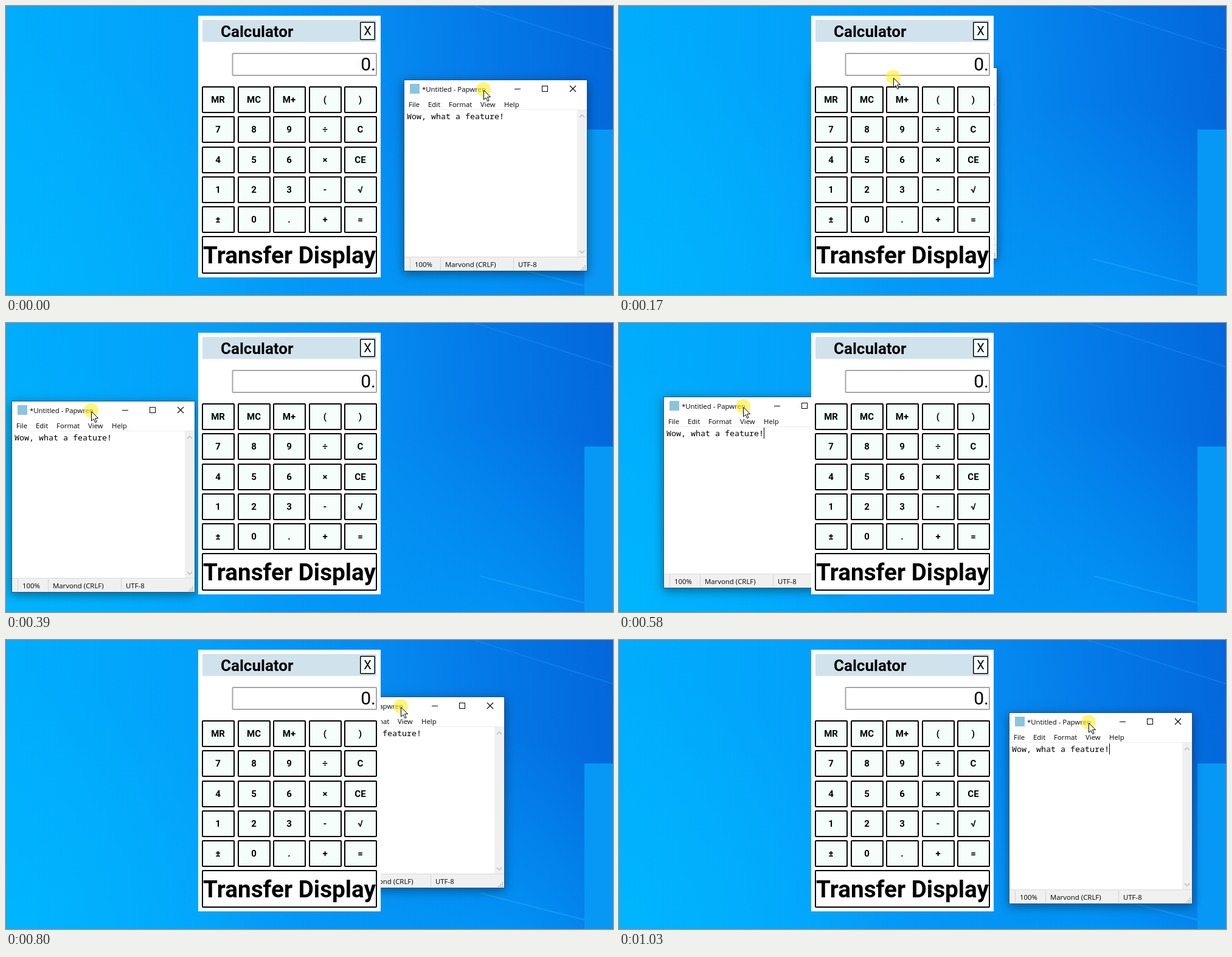
Animation, 998 px wide and 475 px high, one loop 1130 ms. Source, as an HTML page with a canvas:

```html
<!DOCTYPE html>
<html lang="en">
<head>
<meta charset="utf-8">
<title>Calculator and text window</title>
<style>
html, body { margin: 0; width: 100%; height: 100%; overflow: hidden; background: #0494f5; }
canvas { display: block; }
</style>
</head>
<body>
<canvas id="stage" width="998" height="475"></canvas>
<script>
const W = 998, H = 475, LOOP = 1130;
const ctx = document.getElementById('stage').getContext('2d');
const UI = '11.4px "Open Sans", sans-serif';

// Moments at which the dragged window is repainted.
const ticks = [0, 50, 120, 170, 220, 290, 340, 390, 460, 510,
  580, 630, 680, 750, 800, 850, 910, 970, 1030];

// Drag path: time, x, y, x speed, y speed.
const path = [
  [0, 655, 122, -1.5, -0.22],
  [120, 436, 101, -2.1, -0.03],
  [290, 65, 114, -1.4, 0.12],
  [390, 10, 129, 0, 0.03],
  [580, 74, 122, 1.2, -0.1],
  [800, 519, 94, 1.4, 0.02],
  [1030, 642, 120, 0.05, 0.07]
];

function hermite(a, b, va, vb, u, d) {
  const u2 = u * u, u3 = u2 * u;
  return a * (2 * u3 - 3 * u2 + 1) + b * (3 * u2 - 2 * u3)
    + d * (va * (u3 - 2 * u2 + u) + vb * (u3 - u2));
}

function windowPos(t) {
  let i = 0;
  while (i < path.length - 2 && t >= path[i + 1][0]) i++;
  const a = path[i], b = path[i + 1], d = b[0] - a[0];
  const u = Math.min(1, (t - a[0]) / d);
  return [1, 2].map(k => Math.round(hermite(a[k], b[k], a[k + 2], b[k + 2], u, d)));
}

function rect(x, y, w, h, color) {
  ctx.fillStyle = color;
  ctx.fillRect(x, y, w, h);
}

function box(x, y, w, h, fill, stroke, lw) {
  ctx.beginPath();
  ctx.roundRect(x + lw / 2, y + lw / 2, w - lw, h - lw, 1);
  ctx.fillStyle = fill;
  ctx.fill();
  ctx.strokeStyle = stroke;
  ctx.lineWidth = lw;
  ctx.stroke();
}

function line(points, color, lw) {
  ctx.beginPath();
  points.forEach(([x, y]) => ctx.lineTo(x, y));
  ctx.strokeStyle = color;
  ctx.lineWidth = lw;
  ctx.stroke();
}

function text(s, x, y, font, align = 'left') {
  ctx.font = font;
  ctx.textAlign = align;
  ctx.fillStyle = '#000';
  ctx.fillText(s, x, y);
}

function fade(g, stops) {
  stops.forEach(([p, c]) => g.addColorStop(p, c));
  ctx.fillStyle = g;
  ctx.fillRect(0, 0, W, H);
}

function desktop() {
  fade(ctx.createLinearGradient(0, 90, W, 0), [
    [0, '#00adfd'], [0.3, '#03a2fa'], [0.6, '#058cf1'], [0.8, '#0478e7'], [1, '#0367db']
  ]);
  fade(ctx.createRadialGradient(0, H, 0, 0, H, 420), [
    [0, 'rgba(0,184,255,.7)'], [1, 'rgba(0,184,255,0)']
  ]);
  fade(ctx.createRadialGradient(800, 560, 0, 800, 560, 400), [
    [0, 'rgba(0,160,252,.8)'], [1, 'rgba(0,160,252,0)']
  ]);
  line([[770, 0], [W, 72]], 'rgba(30,146,250,.55)', 1.5);
  line([[780, 416], [W, 472]], 'rgba(50,175,255,.45)', 2);
  rect(951, 203, 272, 272, '#0798f6');
}

function calculator() {
  rect(316, 16, 300, 430, '#fff');
  rect(323, 23, 286, 36, '#d0e2ec');
  text('Calculator', 353, 51, 'bold 26px Roboto, sans-serif');
  box(582, 26, 25, 30, '#f5fcfb', '#000', 1.5);
  text('X', 594.5, 48, '20px Roboto, sans-serif', 'center');
  box(371.5, 77, 238.5, 38, '#fff', '#a6a6a6', 2);
  text('0.', 608, 106, '30px Roboto, sans-serif', 'right');

  const keys = 'MR MC M+ ( ) 7 8 9 ÷ C 4 5 6 × CE 1 2 3 - √ ± 0 . + ='.split(' ');
  keys.forEach((key, i) => {
    const x = Math.round(322 + (i % 5) * 58.55);
    const y = Math.round(132 + Math.floor(i / 5) * 49.3);
    box(x, y, 54, 44, '#f6fefc', '#000', 2);
    text(key, x + 26.5, y + 27, 'bold 15px Roboto, sans-serif', 'center');
  });

  box(322, 378, 288, 62, '#fff', '#000', 2);
  text('Transfer Display', 466, 423, 'bold 38.7px Roboto, sans-serif', 'center');
}

function editor(x, y, caret) {
  ctx.save();
  ctx.translate(x, y);
  ctx.shadowColor = 'rgba(0,0,0,.42)';
  ctx.shadowBlur = 16;
  ctx.shadowOffsetY = 4;
  rect(-1, -1, 302, 315, '#2d5573');
  ctx.shadowColor = 'transparent';
  rect(0, 0, 300, 313, '#fff');

  rect(9, 6, 16, 16, '#8cc4dd');
  text('*Untitled - Papwren', 29, 19, UI);
  rect(181, 14, 10, 1, '#000');
  ctx.strokeStyle = '#000';
  ctx.lineWidth = 1;
  ctx.strokeRect(226.5, 9.5, 9, 9);
  line([[272, 9], [282, 19]], '#000', 1.1);
  line([[282, 9], [272, 19]], '#000', 1.1);

  [['File', 7], ['Edit', 39], ['Format', 73], ['View', 125], ['Help', 164]]
    .forEach(([s, mx]) => text(s, mx, 44, UI));
  rect(0, 48, 300, 1, '#ececec');

  text('Wow, what a feature!', 4, 64, '13.333px "Noto Sans Mono", monospace');
  if (caret) rect(164, 50, 1, 18, '#000');

  rect(284, 49, 16, 241, '#f0f0f0');
  line([[288, 61], [292, 57], [296, 61]], '#bababa', 1.5);
  line([[288, 280], [292, 284], [296, 280]], '#bababa', 1.5);

  rect(0, 290, 300, 23, '#f0f0f0');
  rect(0, 290, 300, 1, '#d9d9d9');
  [9, 59, 179].forEach(sx => rect(sx, 292, 1, 20, '#d2d2d2'));
  [['100%', 17], ['Marvond (CRLF)', 67], ['UTF-8', 187]]
    .forEach(([s, sx]) => text(s, sx, 307, UI));
  for (let r = 0; r < 3; r++)
    for (let c = 2 - r; c < 3; c++) rect(290 + c * 3, 304 + r * 3, 2, 2, '#bdbdbd');
  ctx.restore();
}

function pointer(x, y) {
  ctx.beginPath();
  ctx.arc(x, y - 1, 12, 0, Math.PI * 2);
  ctx.fillStyle = 'rgba(255,240,50,.65)';
  ctx.fill();
  ctx.beginPath();
  [[0, 0], [0, 15.5], [3.6, 12.2], [6.2, 18], [8.6, 17], [6.1, 11.2], [11, 11]]
    .forEach(([px, py]) => ctx.lineTo(x + px + 0.5, y + py + 0.5));
  ctx.closePath();
  ctx.fillStyle = '#fff';
  ctx.fill();
  ctx.strokeStyle = '#000';
  ctx.lineWidth = 1;
  ctx.stroke();
}

function draw(time) {
  const now = time % LOOP;
  const t = ticks.filter(v => v <= now).pop();
  const [x, y] = windowPos(t);
  const caretOn = (t + 435) % 450 < 225;
  desktop();
  editor(x, y, caretOn);
  calculator();
  pointer(x + 130, y + 16);
}

const start = performance.now();
function loop() {
  draw(performance.now() - start);
  requestAnimationFrame(loop);
}
loop();
</script>
</body>
</html>
```
